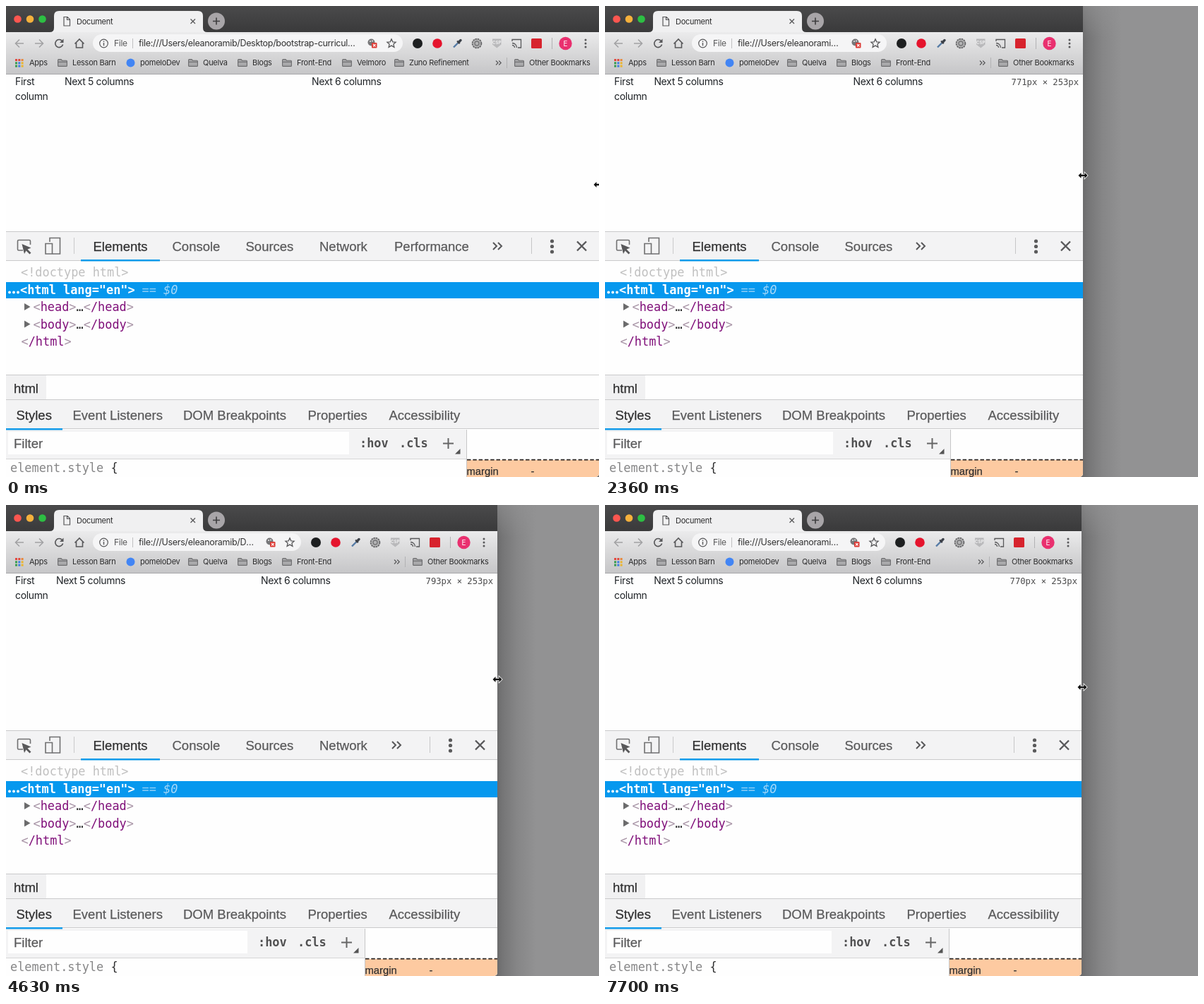
Recreate the animation shown at these times as an HTML page. Size 840 by 667 pixels, loop 8000 ms.

```html
<!DOCTYPE html>
<html lang="en">
<head>
<meta charset="utf-8">
<title>Responsive columns</title>
<style>
  html, body { margin: 0; width: 100%; height: 100%; overflow: hidden; background: #929293; }
  #stage { position: absolute; left: 0; top: 0; width: 840px; height: 667px; overflow: hidden; }
  #stage div, #stage svg, #stage span { position: absolute; }
  svg { display: block; }
  #shade { top: 0; bottom: 0; width: 60px; background:
    linear-gradient(#92929399, #92929300 45px),
    linear-gradient(90deg, #646465, #757576 20%, #868687 55%, #929293); }
  #win { left: 0; top: 0; height: 667px; overflow: hidden; background: #fefefe; border-bottom-right-radius: 5px; }
  .bar { left: 0; right: 0; }
  .title { top: 0; height: 37px; background: linear-gradient(#4a4a4b, #3a3a3b); }
  .tools { top: 37px; height: 59px; background: linear-gradient(#ebebec, #dadadb 45%, #c6c6c8); border-bottom: 1px solid #a9a9ab; }
  .omni { left: 123px; right: 278px; top: 40px; height: 25px; border-radius: 13px; background: #f5f5f6; }
  .tabs { height: 40px; background: #f3f3f4; border-bottom: 1px solid #cacacb; }
  .line { height: 1px; background: #cacacb; }
  .pick { top: 391px; height: 23px; background: #0698ee; }
  .filter { left: 0; right: 188px; top: 600px; height: 41px; background: #f3f3f4; border-bottom: 1px solid #d5d5d6; }
  .input { left: 3px; right: 354px; top: 603px; height: 32px; background: #fefefe; }
  .box { right: 0; width: 187px; top: 600px; height: 67px; background: #fefefe; border-left: 1px solid #c6c6c7; }
  .ui, #url { font: 11px Inter, sans-serif; letter-spacing: -.025em; fill: #2c2c2d; }
  #url { left: 188px; right: 340px; top: 43px; font-size: 12.5px; line-height: 19px; color: #333; white-space: nowrap; overflow: hidden; text-overflow: ellipsis; }
  .page { font: 14px/21px Inter, sans-serif; letter-spacing: -.025em; color: #1f2327; white-space: nowrap; }
  .dev { font: 18.5px "Liberation Sans", Arial, sans-serif; fill: #5a5a5b; stroke: #5a5a5b; stroke-width: .25; }
  .on { fill: #303031; stroke: #303031; }
  .code { font: 16.9px "DejaVu Sans Mono", monospace; fill: #a894a6; }
  .tag { fill: #80107a; }
  .ink { fill: #303031; }
  .dim { fill: #c0c0c0; }
  .b { font-weight: bold; }
  #size { right: 6px; top: 99px; font: 12.2px/18px "DejaVu Sans Mono", monospace; color: #4b4b4c; white-space: nowrap; }
  .ico { fill: none; stroke: #58585a; stroke-width: 1.6; }
</style>
</head>
<body>
<div id="stage">
  <div id="shade"></div>
  <div id="win">
    <div class="bar title"></div>
    <div class="bar tools"></div>
    <div class="omni"></div>
    <div class="bar line" style="top:319px;height:2px"></div>
    <div class="bar tabs" style="top:320px"></div>
    <div class="bar pick"></div>
    <div class="bar line" style="top:522px"></div>
    <div class="bar line" style="top:557px"></div>
    <div class="bar tabs" style="top:558px"></div>
    <div class="filter"></div>
    <div class="input"></div>
    <div class="box"></div>

    <span id="url">file:///Users/eleanoramib/Desktop/bootstrap-curriculum/index.html</span>
    <div id="c1" class="page" style="left:13px;top:96px"></div>
    <div id="c2" class="page">Next 5 columns</div>
    <div id="c3" class="page">Next 6 columns</div>
    <div id="size"></div>

    <svg width="840" height="667" style="left:0;top:0">
      <defs>
        <g id="folder" fill="#a9a9ab" stroke="#6c6c6e" stroke-width="1.1">
          <path d="M.6 9.4V1.6Q.6.6 1.6.6H5L6.5 2.2H12.4Q13.4 2.2 13.4 3.2V9.4Q13.4 10.4 12.4 10.4H1.6Q.6 10.4 .6 9.4Z"/>
          <path d="M.6 4.3H13.4"/>
        </g>
        <path id="more" d="M0 0l5 5-5 5M7 0l5 5-5 5"/>
      </defs>
      <circle cx="16.5" cy="18.5" r="5.3" fill="#fc5650"/>
      <circle cx="34" cy="18.5" r="5.3" fill="#f6b13c"/>
      <circle cx="51.5" cy="18.5" r="5.3" fill="#2dbf43"/>
      <path d="M62 37Q68 37 68 31V14Q68 7 75 7H272Q279 7 279 14V31Q279 37 285 37Z" fill="#f0f0f1"/>
      <path class="ico" d="M82 15.5h5l3.5 3.5v9h-8.5zM86.5 15.5v4h4" style="stroke-width:1.2"/>
      <path class="ico" d="M261.5 18.5l6.5 6.5M268 18.5l-6.5 6.5" style="stroke-width:1.3"/>
      <text class="ui" x="100" y="25.5">Document</text>
      <circle cx="298" cy="21.5" r="12" fill="#a8a5a8"/>
      <path class="ico" d="M293 21.5h10M298 16.5v10" style="stroke:#3d3d3e"/>
      <g class="ico">
        <path d="M25 53H14M19 47.5L13.5 53l5.5 5.5M41 53h11M47 47.5l5.5 5.5-5.5 5.5" stroke="#a2a2a4"/>
        <path d="M79.5 49.5A5.5 5.5 0 1 0 80.6 54.5"/>
        <path d="M81.5 46.5v5.5H76z" fill="#58585a" stroke="none"/>
        <path d="M97.5 53.5l6.5-6.5 6.5 6.5M99.5 52v7h9v-7"/>
        <circle cx="138.5" cy="53" r="5.8" stroke-width="1.2"/>
        <path d="M138.5 52v4.2M138.5 49.5v1.5" stroke-width="1.4"/>
        <path d="M179.5 46v14" stroke="#c0c0c1" stroke-width="1"/>
      </g>
      <text class="ui" x="153" y="57" style="font-size:12px;fill:#59595a">File</text>
      <g id="apps"></g>
      <g id="marks" class="ui"></g>

      <g class="ico">
        <path d="M24 346H18q-1.5 0-1.5-1.5V333q0-1.5 1.5-1.5H33q1.5 0 1.5 1.5v5" stroke="#707071"/>
        <path d="M22.5 337l13 5.5-5 2 5 5-2 2-5-5-2.5 4.5z" fill="#58585a" stroke="none"/>
        <path d="M62 334v-5.5h14.5V351H66" stroke="#707071"/>
        <path d="M56 336.5h9.5V351H56z" stroke="#707071"/>
        <path d="M96.5 328v23" stroke="#cacacb" stroke-width="1"/>
      </g>
      <rect x="106" y="359" width="112" height="2.5" fill="#139bea"/>
      <g id="panels" class="dev"></g>
      <use id="extra" href="#more" y="335" class="ico" style="stroke-width:2"/>

      <g class="code">
        <text class="dim" x="21" y="383">&lt;!doctype html&gt;</text>
        <g fill="#fff">
          <circle cx="5" cy="405.5" r="1.9"/><circle cx="11" cy="405.5" r="1.9"/><circle cx="17" cy="405.5" r="1.9"/>
          <text class="b" x="20" y="407.5">&lt;html lang="en"&gt;</text>
        </g>
        <text x="192.5" y="407.5" fill="#8fcdf6">==</text>
        <text x="223" y="407.5" fill="#a8d8f8" font-style="italic">$0</text>
        <path d="M26 421l8.500 5-8.500 5zM26 445.500l8.500 5-8.500 5z" fill="#6b6b6c"/>
        <text x="38.5" y="432">&lt;<tspan class="tag">head</tspan>&gt;<tspan class="ink">…</tspan>&lt;<tspan class="tag">/head</tspan>&gt;</text>
        <text x="38.5" y="456.5">&lt;<tspan class="tag">body</tspan>&gt;<tspan class="ink">…</tspan>&lt;<tspan class="tag">/body</tspan>&gt;</text>
        <text x="21.5" y="481">&lt;<tspan class="tag">/html</tspan>&gt;</text>
        <text x="6" y="660" fill="#868687">element.style <tspan class="ink">{</tspan></text>
      </g>
      <rect y="523" width="57" height="34" fill="#f1f1f2"/>
      <rect y="598" width="80" height="2.5" fill="#139bea"/>
      <g id="panes" class="dev"><text class="on" x="11" y="548">html</text><text x="11" y="626">Filter</text></g>
    </svg>

    <!-- Pinned to the right edge of the window -->
    <svg width="840" height="667" style="right:0;top:0">
      <circle cx="517.5" cy="51.5" r="5" fill="#777779"/>
      <circle cx="516" cy="50" r="1" fill="#eee"/><circle cx="519" cy="49.5" r="1" fill="#eee"/>
      <rect x="518" y="52" width="7.5" height="7.5" rx="1" fill="#dc3a35"/>
      <path d="M520 54l3.5 3.5M523.5 54l-3.5 3.5" stroke="#fff" stroke-width="1.1"/>
      <path class="ico" d="M546 46.8l1.8 4 4.3.4-3.2 2.9 1 4.3-3.9-2.3-3.9 2.3 1-4.3-3.2-2.9 4.3-.4z" style="stroke-width:1.3"/>
      <circle cx="583" cy="53" r="7" fill="#1d1f20"/>
      <circle cx="611" cy="53" r="6.8" fill="#e5142d"/>
      <path d="M634 58.5l6-6" stroke="#557ba5" stroke-width="2.4"/>
      <path d="M639 49.5l3.8 3.8" stroke="#3c4149" stroke-width="2"/>
      <path d="M641 51.5l3-3" stroke="#3c4149" stroke-width="3.4" stroke-linecap="round"/>
      <circle cx="667" cy="53" r="6.4" fill="#b4b4b5" stroke="#666668" stroke-width="1.8" stroke-dasharray="2.5 .85"/>
      <circle cx="667" cy="53" r="3" fill="none" stroke="#757577" stroke-width="1.4"/>
      <path d="M689 46.5h12.5v8l-6.2 5-6.3-5z" fill="#b9b9bb"/>
      <text x="695.2" y="54" text-anchor="middle" font-size="6" font-family="Inter, sans-serif" font-weight="bold" fill="#f2f2f3">CSP</text>
      <path class="ico" d="M717 50v-2.5h12.5V59H725M717 52.5a6.5 6.5 0 0 1 6.5 6.5M717 55.5a3.5 3.5 0 0 1 3.5 3.5" style="stroke-width:1.3"/>
      <rect x="744" y="46" width="15" height="14" rx="1.5" fill="#d7232d"/>
      <path d="M773.5 45v16M709.5 73v15" stroke="#b2b2b4"/>
      <circle cx="792.5" cy="53" r="9.2" fill="#e9306f"/>
      <text class="ui" x="792.5" y="56.5" text-anchor="middle" style="fill:#fff;font-size:10px">E</text>
      <g fill="#58585a"><circle cx="821" cy="48" r="1.5"/><circle cx="821" cy="53" r="1.5"/><circle cx="821" cy="58" r="1.5"/></g>
      <use href="#more" transform="translate(694 77.5) scale(.6)" class="ico" style="stroke-width:2"/>
      <use href="#folder" x="720" y="75"/>
      <text class="ui" x="741" y="84">Other Bookmarks</text>

      <path d="M744.5 328v23" stroke="#c6c6c7"/>
      <g fill="#5a5a5b"><circle cx="773.5" cy="333" r="2.6"/><circle cx="773.5" cy="340.5" r="2.6"/><circle cx="773.5" cy="348" r="2.6"/></g>
      <path class="ico" d="M809 333.5l13 13M822 333.5l-13 13" style="stroke-width:2.3"/>

      <g class="code b" style="fill:#515152"><text x="501" y="625">:hov</text><text x="557" y="625">.cls</text></g>
      <path class="ico" d="M619 619.5h15M626.5 612v15" style="stroke-width:2;stroke:#666"/>
      <path d="M643.5 627v7.5H636z" fill="#555"/>
      <rect x="653" y="643" width="187" height="24" fill="#fdcaa1"/>
      <path d="M653 642.7H840" stroke="#2a2523" stroke-width="1.8" stroke-dasharray="5.5 2.8"/>
      <g class="dev" style="font-size:14.8px"><text class="on" x="652.5" y="663.5">margin</text><text class="on" x="743.5" y="663.5">-</text></g>
    </svg>
  </div>
  <svg id="cursor" width="20" height="14" style="left:0;top:0" viewBox="-10 -7 20 14">
    <path d="M-6.5 0L-2.5-4V-1.2H2.5V-4L6.5 0 2.5 4V1.2H-2.5V4Z" fill="#111" stroke="#fff" stroke-width="1.6" paint-order="stroke"/>
  </svg>
</div>
<script>
const $ = id => document.getElementById(id);
const LOOP = 8000, ZOOM = 0.877, MD = 768;

// time, window width, pointer x, pointer y
const path = [
  [0, 840, 839, 253], [790, 840, 839, 252], [800, 832, 812, 250],
  [960, 749, 717, 233], [1000, 749, 717, 233], [1130, 709, 709, 235],
  [1290, 709, 709, 235], [1730, 685, 686, 239], [2090, 685, 686, 239],
  [2900, 660, 660, 241], [2930, 660.5, 662, 241], [3060, 665.6, 671, 242],
  [3100, 665.6, 671, 242], [3730, 705.3, 706, 246], [4150, 705.3, 706, 246],
  [4420, 686, 686, 247], [4630, 696, 696, 247], [4790, 696, 696, 247],
  [5000, 692, 692, 248], [5260, 694, 693, 248], [5520, 694, 693, 248],
  [5530, 693, 691.5, 248.5], [5560, 693, 691.5, 248.5], [5630, 692, 692, 249],
  [5850, 692, 692, 249], [6250, 677, 677, 252], [6600, 682, 683, 253],
  [6829, 682, 683, 253], [6830, 682, 681, 254], [6990, 682, 681, 254],
  [7700, 675.4, 676, 258], [LOOP, 675.4, 676, 258]
];

// label, icon x, text x, narrowest window that shows it
const marks = [
  ["Lesson Barn", 73, 94, 0], ["pomeloDev", 0, 190, 0], ["Quelva", 258, 279, 0],
  ["Blogs", 328, 349, 0], ["Front-End", 391, 412, 0],
  ["Velmoro", 476, 497, 699], ["Zuno Refinement", 550, 571, 817]
];

// label, left, right, narrowest window that shows it
const panels = [
  ["Elements", 123.5, 200, 0], ["Console", 235.5, 303, 0], ["Sources", 339.5, 407, 0],
  ["Network", 444, 513, 680], ["Performance", 550, 656, 823]
];

const label = (x, y, s, cls = "") => `<text class="${cls}" x="${x}" y="${y}">${s}</text>`;

const dots = ["#e0483e", "#e0483e", "#e8873a", "#3a9d50", "#3f7de0", "#eab42f", "#3a9d50", "#3f7de0", "#eab42f"];
$("apps").innerHTML = dots.map((c, i) =>
  `<rect x="${13 + i % 3 * 4.3}" y="${75 + Math.floor(i / 3) * 4.3}" width="3" height="3" fill="${c}"/>`
).join("") + label(33, 84, "Apps", "ui");

$("marks").innerHTML = marks.map(([s, icon, x]) => "<g>" +
  (icon ? `<use href="#folder" x="${icon}" y="75"/>` : '<circle cx="176.5" cy="80.5" r="6" fill="#4285f4"/>') +
  label(x, 84, s) + "</g>").join("");

$("panels").innerHTML = panels.map(([s, x], i) => label(x, 347, s, i ? "" : "on")).join("");

$("panes").innerHTML += [
  ["Styles", 14.5], ["Event Listeners", 94.5], ["DOM Breakpoints", 251], ["Properties", 427.5], ["Accessibility", 542.5]
].map(([s, x], i) => label(x, 586, s, i ? "" : "on")).join("");

function poseAt(t) {
  let i = 1;
  while (i < path.length - 1 && t >= path[i][0]) i++;
  const a = path[i - 1], b = path[i], k = (t - a[0]) / (b[0] - a[0]);
  return a.slice(1).map((v, j) => v + (b[j + 1] - v) * k);
}

function showFitting(group, items, w) {
  items.forEach((item, i) => {
    group.children[i].style.display = w >= item[3] ? "" : "none";
  });
}

function place(el, x, y) {
  el.style.left = x + "px";
  el.style.top = y + "px";
}

function draw(t) {
  const [exact, cx, cy] = poseAt(t);
  const w = Math.round(exact);
  const px = Math.floor(exact / ZOOM);
  $("win").style.width = w + "px";
  $("shade").style.left = w - 5 + "px";

  showFitting($("marks"), marks, w);
  showFitting($("panels"), panels, w);
  const last = panels.filter(p => w >= p[3]).pop();
  $("extra").setAttribute("x", last[2] + 34);

  const wide = px >= MD;
  $("c1").innerHTML = wide ? "First<br>column" : "First column";
  place($("c2"), wide ? w / 12 + 13 : 13, wide ? 96 : 117);
  place($("c3"), wide ? w / 2 + 13 : 13, wide ? 96 : 138);

  $("size").textContent = t < 800 ? "" : `${px}px × 253px`;
  $("cursor").style.display = t >= 130 && t < 800 ? "none" : "";
  place($("cursor"), cx - 10, cy - 7);
}

const start = performance.now();
function tick() {
  draw((performance.now() - start) % LOOP);
  requestAnimationFrame(tick);
}
tick();
</script>
</body>
</html>
```
